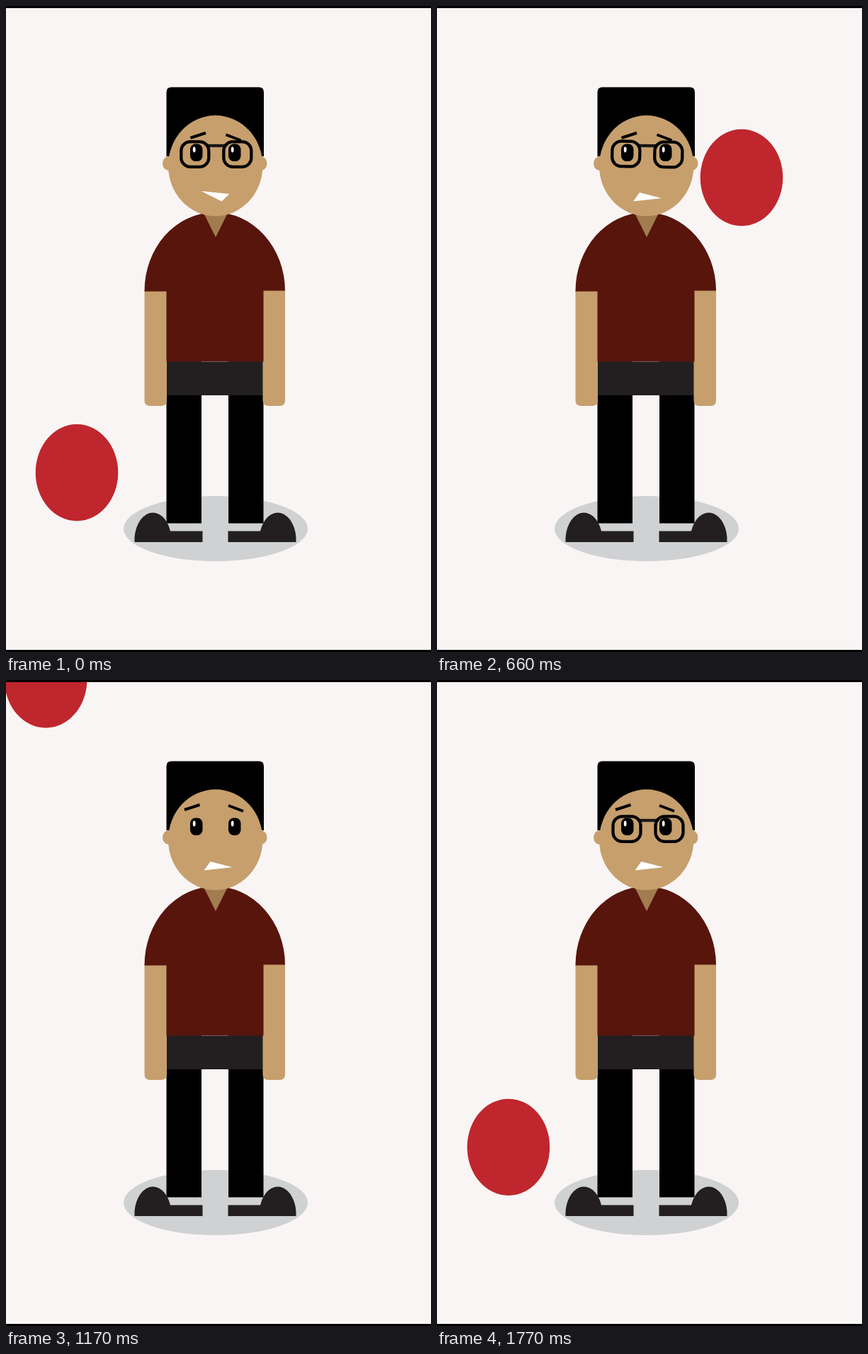
Recreate the animation shown at these times as an HTML page. Size 600 px wide and 911 px high, loop 1800 ms.

```html
<!DOCTYPE html>
<html lang="en">
<head>
<meta charset="utf-8">
<title>Ball and glasses</title>
<style>
html, body { margin: 0; width: 100%; height: 100%; overflow: hidden; background: #f9f5f4; }
svg { display: block; width: 100%; height: 100%; }
</style>
</head>
<body>
<svg viewBox="0 0 600 911">
  <rect width="600" height="911" fill="#f9f5f4"/>
  <ellipse cx="296" cy="737" rx="130" ry="46" fill="#cfd1d2"/>

  <path d="M226.500 548h49.500v181.500h-49.500zM314 548h49.500v181.500h-49.500z"/>
  <g fill="#231f20">
    <path d="M226.500 501h137v48h-137z"/>
    <path id="shoe" d="M181.500 756a26 38.500 0 0 1 50.500-15.500h45.500v15.500z"/>
    <use href="#shoe" transform="matrix(-1 0 0 1 591 0)"/>
  </g>

  <g fill="#c69f6d">
    <path id="arm" d="M195.500 401h31.500v155q0 8-8 8h-15.500q-8 0-8-8z"/>
    <use href="#arm" transform="matrix(-1 0 0 1 589.500 0)"/>
  </g>
  <path d="M195.500 402.500a99.250 111 0 0 1 198.500-1h-30.500v100h-137v-99z" fill="#58150c"/>
  <path d="M276 501.500h38" stroke="#6f5f5d"/>
  <path d="M279 292h34l-17 34z" fill="#a27c4e"/>

  <path d="M226.500 212v-90.500q0-7 7-7h123.500q7 0 7 7v90.500z"/>
  <g fill="#c69f6d">
    <ellipse cx="229.500" cy="222" rx="8.500" ry="10"/>
    <ellipse cx="360" cy="222" rx="8.500" ry="10"/>
    <ellipse cx="295.700" cy="225.300" rx="66.700" ry="71"/>
  </g>
  <g id="eye">
    <rect x="260" y="194.500" width="17.500" height="24.500" rx="7.500"/>
    <ellipse cx="265.700" cy="202.500" rx="1.900" ry="4" fill="#fff"/>
  </g>
  <use href="#eye" x="54"/>
  <g stroke="#000" stroke-width="4">
    <path id="browL" d="M260.500 186l21.500-7"/>
    <path id="browR" d="M310.500 181.500l21 8"/>
  </g>
  <path id="mouth" fill="#fff"/>

  <g id="glasses" fill="none" stroke="#000" stroke-width="4.300">
    <path d="M-13-12h26" stroke="#1a1718"/>
    <rect id="lens" x="-49.500" y="-17.700" width="39" height="35.500" rx="13"/>
    <use href="#lens" x="60"/>
  </g>
  <ellipse id="ball" rx="58.300" ry="68.200" fill="#c0262d"/>

  <path d="M0 0h600v3h-600zM0 908h600v3h-600z"/>
</svg>
<script>
const LOOP = 1800, STEP = 30;
const HIT = 680, LAND = 1660, REST = 1500;
const el = id => document.getElementById(id);
const clamp = v => Math.min(1, Math.max(0, v));

function ballAt(t) {
  if (t < 330) {                          // rolls out on the left
    const p = (t / 270) ** 2;
    return [100 - 165 * p, 658 - 8 * p];
  }
  if (t < HIT) {                          // flies in at the head
    const d = 660 - t;
    return [430 + 0.94 * d, 242 + 0.95 * d];
  }
  if (t < 1000) {                         // bounces off, up and right
    const d = t - HIT;
    return [411 + 0.5 * d, 223 - 1.3 * d];
  }
  if (t < LAND) {                         // drops in on the left, slowing down
    const q = ((LAND - t) / 340) ** 2;
    return [119.5 - 30.5 * q, 666 - 321 * q];
  }
  const q = ((LOOP - t) / (LOOP - LAND)) ** 2;
  return [100 + 19.5 * q, 658.5 + 7.5 * q];
}

function glassesAt(t) {
  if (t < HIT) return [296.8, 209, t < 660 ? 0 : 1];
  if (t < 1110) {                         // knocked off, falling left
    const s = (t - 690) / 270;
    return [297 - 233.5 * s, 209 + 152.5 * s * s, -18 * s];
  }
  const p = Math.max(0, (REST - t) / 180);
  return [298 + 213 * p, 210 - 39.5 * p, -10.5 * p];
}

function move(id, x, y, angle = 0) {
  el(id).setAttribute("transform", `translate(${x} ${y}) rotate(${angle})`);
}

function draw(t) {
  move("ball", ...ballAt(t));
  move("glasses", ...glassesAt(t));
  const shock = clamp((t - 660) / 60);
  move("browL", -8.5 * shock, -3 * shock);
  move("browR", 3.5 * shock, -4.5 * shock);
  move("mouth", 2.5 * shock, -7 * shock);
  el("mouth").setAttribute("d", t < 630 ? "M275.5 261l40 4-11 10.500z" : "M286 263l31 8-40 4.500z");
}

const start = performance.now();
function frame() {
  const t = (performance.now() - start) % LOOP;
  draw(Math.floor(t / STEP) * STEP);
  requestAnimationFrame(frame);
}
frame();
</script>
</body>
</html>
```
